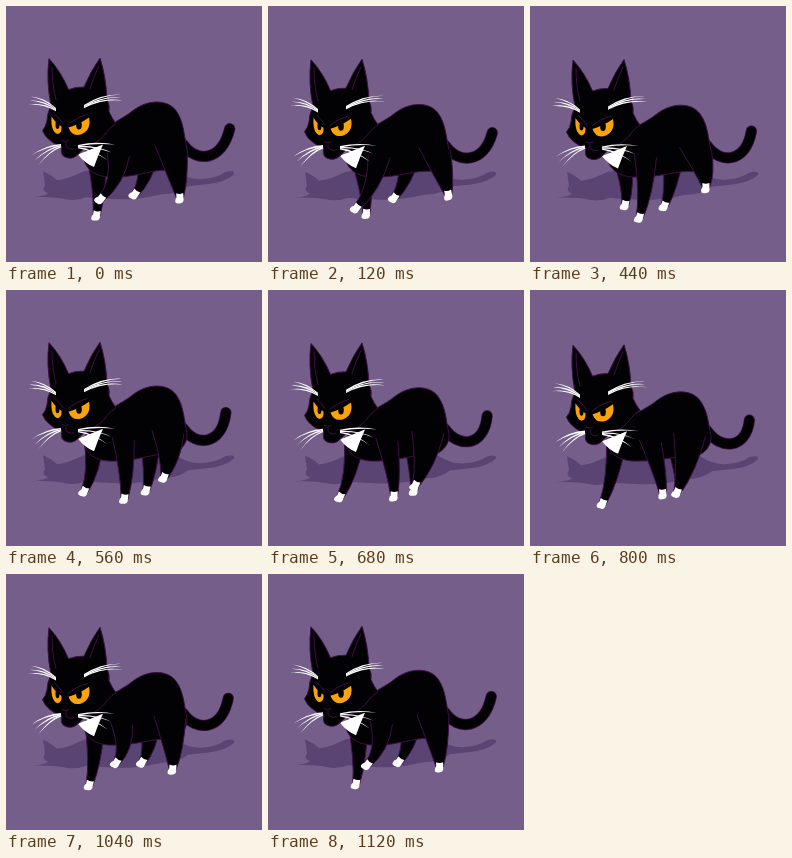
Recreate the animation shown at these times as an HTML page. Size 256x256 px, loop 1.16 s.

```html
<!DOCTYPE html>
<html lang="en">
<head>
<meta charset="utf-8">
<title>Prowling cat</title>
<style>
  html, body { margin: 0; width: 100%; height: 100%; overflow: hidden; background: #755f8a; }
  svg { display: block; width: 100vw; height: 100vh; }
  .fur { fill: #020103; stroke: #3f0f45; stroke-width: 1; stroke-linejoin: round; }
  .line { fill: none; stroke: #3f0f45; stroke-width: 1; stroke-linecap: round; }
  .tail { fill: none; stroke: #020103; stroke-width: 9.6; stroke-linecap: round; }
  .tail.edge { stroke: #3f0f45; stroke-width: 11.2; }
  .white { fill: #fff; }
  .eye { fill: #fba30c; }
  .shade { fill: #5a4473; }
</style>
</head>
<body>
<svg viewBox="0 0 256 256">
  <path id="shadow" class="shade" d="M25 191 Q38 190 42 187 Q35 184 39 179 L37 165 Q46 169 51 174
    Q58 173 64 171 L78 165 Q125 158 170 165 Q182 173 194 173 Q211 172 219 166 Q229 163 228 168
    Q220 176 201 178 Q190 179 182 180 Q172 188 156 188 Q140 192 124 193 Q100 193 80 191
    Q70 195 60 193 Q45 190 25 191Z"/>
  <path class="tail edge"/>
  <path class="tail"/>
  <g id="farLegs"></g>
  <path id="body" class="fur"/>
  <g id="nearLegs"></g>
  <g id="head">
    <path class="white" d="M72 148 L97 138 Q92 149 88 160.500 Q79 157 72 148Z"/>
    <path class="fur" d="M45 99 Q40 74 43 52 Q55 65 62.500 83 Q70 80 78 80.500 Q85 64 94 51.500
      Q100 70 101 93 Q104 99 103 105 Q106 112 110 117 Q105 120 101 125 Q95 134 85 138
      Q77 142 72 148 Q66 154 58 150 Q54 147 56 140 Q48 138 43 133 Q39 130 36.500 124
      Q40 120 41 114 Q41 107 45 99Z"/>
    <path class="line" d="M48 107 Q54 112 57 117 M62 118 Q70 111 81 108 M56 134 Q60 136 63 134
      M60 136 V140 Q64 144 68 142 M46 60 Q46 78 50 93 M93 59 Q87 72 84 82"/>
    <path class="eye" d="M45.500 110 Q50 117 55.500 120 Q56 127 51.500 127.500 Q44.500 125 45.500 110Z"/>
    <path class="eye" d="M62.500 121 Q73 118 83 111 Q85.500 123 76 127.500 Q66 131 62.500 121Z"/>
    <ellipse cx="51.500" cy="118" rx="2" ry="4.500"/>
    <ellipse cx="73" cy="118.500" rx="2.800" ry="4.500"/>
    <g id="whiskers"></g>
  </g>
</svg>
<script>
const LOOP = 1160, STEP = 40, TAU = 2 * Math.PI;
const $ = id => document.getElementById(id);
const mix = (a, b, u) => a + (b - a) * u;
const smooth = u => u * u * (3 - 2 * u);
const wave = (t, peak, beats) => Math.cos(TAU * beats * (t - peak) / LOOP);

function add(parent, cls, d = "") {
  const p = document.createElementNS("http://www.w3.org/2000/svg", "path");
  p.setAttribute("class", cls);
  p.setAttribute("d", d);
  return $(parent).appendChild(p);
}

// Three tapering whiskers from one root; (dx, dy) separates their tips.
function fan(x, y, cx, cy, tx, ty, dx, dy) {
  for (let i = 0; i < 3; i++) {
    const mx = cx + i * dx / 2, my = cy + i * dy / 2;
    add("whiskers", "white", `M${x} ${y + i - 0.6} Q${mx} ${my - 0.8} ${tx + i * dx} ${ty + i * dy}` +
      `Q${mx} ${my + 1} ${x} ${y + i + 0.7}Z`);
  }
}
fan(50, 102, 39, 92, 25, 90, -1.5, 4);
fan(78, 99, 95, 88, 115, 88, 1, 3);
fan(55, 138, 40, 139, 25, 149, 3.5, 5);
fan(72, 139, 91, 135, 109, 138, -3.5, 8);

// The foot stands from land to leave, moving front to back; ease shapes its pace.
const legs = [
  { layer: "farLegs", hip: [145, 155], width: 10, bend: 3, land: 270, leave: 760,
    front: [126, 200], back: [150, 201], lift: 12, ease: 1 },
  { layer: "farLegs", hip: [90, 152], width: 10, bend: 4, land: 780, leave: 1440,
    front: [72, 214], back: [110, 205], lift: 11, ease: 1.3 },
  { layer: "nearLegs", hip: [163, 146], width: 16, bend: 3, land: 830, leave: 1450,
    front: [147, 205], back: [189, 185], lift: 12, ease: 0.7 },
  { layer: "nearLegs", hip: [117, 153], width: 11, bend: 4, land: 270, leave: 800,
    front: [88, 219], back: [133, 204], lift: 24, ease: 0.65 }
];
for (const leg of legs) {
  leg.limb = add(leg.layer, "fur");
  leg.sock = add(leg.layer, "white", "M-3.500 -5 Q0 -3.500 3.500 -5 L3.500 2 Q3 5 0 5 Q-5 6 -5 3 Q-5 1 -3.500 -1Z");
}

function footAt(leg, t) {
  const age = (t - leg.land + LOOP) % LOOP, stand = leg.leave - leg.land;
  let u, lift = 0;
  if (age < stand) {
    u = (age / stand) ** leg.ease;
  } else {
    const swing = (age - stand) / (LOOP - stand);
    u = 1 - smooth(Math.min(1, swing / 0.75));
    lift = leg.lift * Math.sin(Math.PI * swing);
  }
  return [mix(leg.front[0], leg.back[0], u), mix(leg.front[1], leg.back[1], u) - lift, lift];
}

function drawLeg(leg, t, drop) {
  const [x, y, lift] = footAt(leg, t), w = leg.width;
  const hx = mix(leg.hip[0], x, 0.2), hy = leg.hip[1] + drop;
  const kx = (hx + x) / 2 + leg.bend + lift * 0.2, ky = mix(hy, y, 0.6);
  const dx = x - kx, dy = y - ky, len = Math.hypot(dx, dy);
  const nx = dy / len * 3.4, ny = -dx / len * 3.4;
  leg.limb.setAttribute("d",
    `M${hx - w} ${hy - 6} Q${kx - w * 0.6} ${ky} ${x - nx} ${y - ny}` +
    `L${x + nx} ${y + ny} Q${kx + w * 0.6} ${ky} ${hx + w} ${hy - 3}`);
  const turn = Math.atan2(-dx, dy) * 360 / TAU;
  leg.sock.setAttribute("transform", `translate(${x} ${y}) rotate(${turn * 0.8})`);
}

function draw(t) {
  const nod = 2.1 - 1.5 * wave(t, 0, 2);
  const b = 4 - 3.4 * wave(t, 0, 2), h = b * 0.4;
  const tipX = 221.7 + 2.6 * wave(t, 130, 1), tipY = 126.5 + 4 * wave(t, 260, 2);
  $("head").setAttribute("transform", `translate(0 ${nod})`);
  $("shadow").setAttribute("transform", `translate(0 ${nod * 0.4})`);
  $("body").setAttribute("d",
    `M86 ${132 + h} C100 ${119 + b} 116 ${113 + b} 127 ${104 + b}` +
    `C141 ${93 + b} 161 ${92 + b} 170 ${104 + b} C178 ${115 + b} 178 ${130 + h} 181 ${143 + h}` +
    `C182 ${153 + h} 174 ${164 + h} 161 ${164 + h} C148 ${163 + h} 130 171 110 171` +
    `C94 172 80 167 77 ${150 + h}Z`);
  const tail = `M177 ${138 + h} C190 ${157 + h} 216 ${mix(157, tipY + 32, 0.6)} ${tipX} ${tipY}`;
  document.querySelectorAll(".tail").forEach(p => p.setAttribute("d", tail));
  for (const leg of legs) drawLeg(leg, t, h);
}

const start = performance.now();
function tick() {
  const t = (performance.now() - start) % LOOP;
  draw(Math.floor(t / STEP) * STEP);
  requestAnimationFrame(tick);
}
tick();
</script>
</body>
</html>
```
